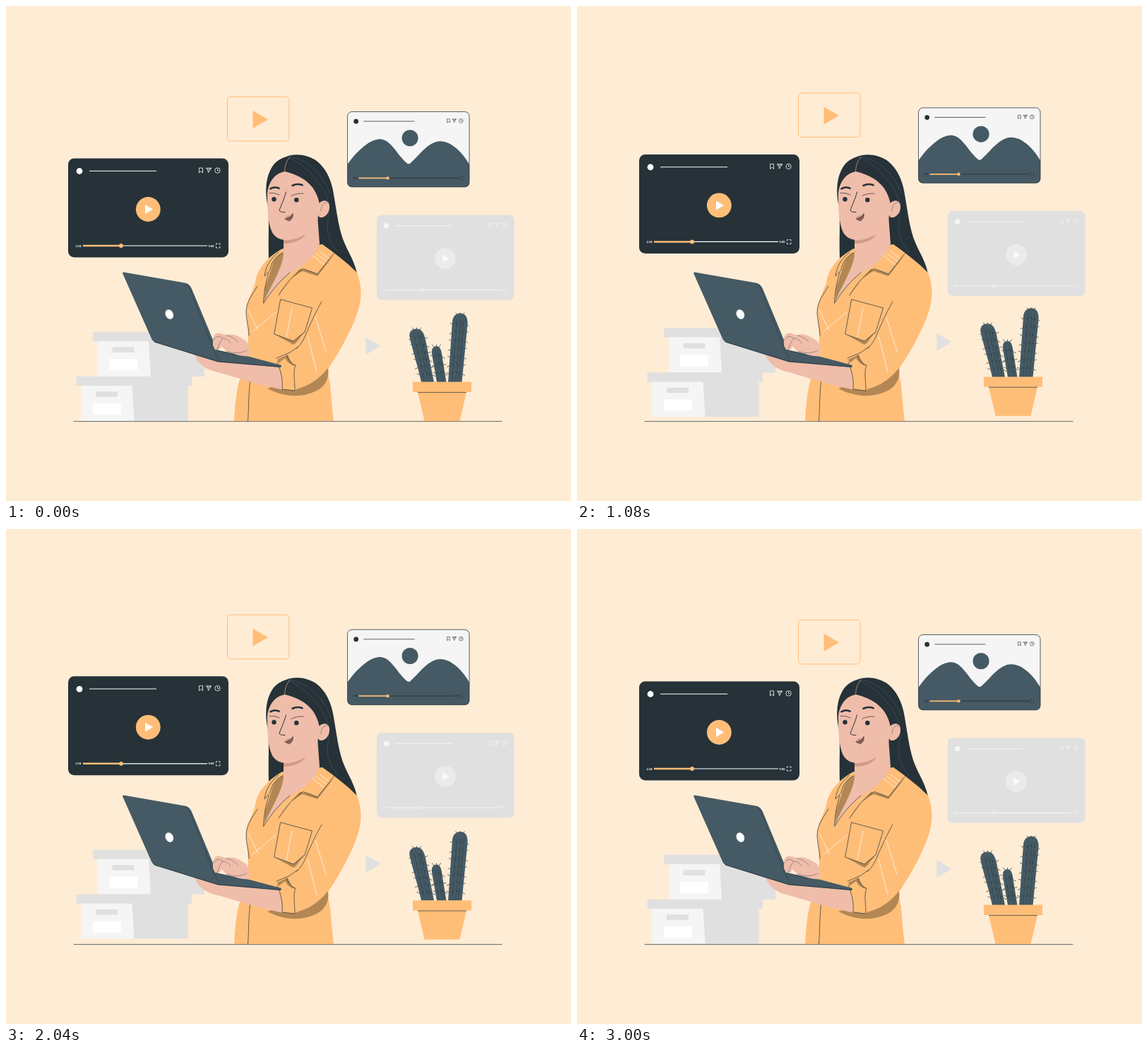
Recreate the animation shown at these times as an HTML page. Size 800 px wide and 700 px high, loop 3040 ms.

```html
<!DOCTYPE html>
<html lang="en">
<head>
<meta charset="utf-8">
<title>Video studio</title>
<style>
  html, body { margin: 0; width: 100%; height: 100%; overflow: hidden; background: #ffecd5; }
  svg { display: block; width: 800px; height: 700px; }
  .orange { fill: #ffbe78; }
  .brown { fill: #b28754; }
  .skin { fill: #efbdaa; }
  .blush { fill: #d39b87; }
  .slate { fill: #455a64; }
  .dark { fill: #263238; }
  .grey { fill: #e0e0e0; }
  .pale { fill: #f5f5f5; }
  .white { fill: #fff; }
  .ink, .stitch, .strand { fill: none; stroke-linecap: round; stroke-linejoin: round; }
  .ink { stroke: #263238; stroke-width: .7; }
  .brow { stroke-width: 2.6; }
  .soft { stroke-opacity: .55; }
  .fine { stroke-width: .5; }
  .stitch { stroke: #fff; stroke-width: .7; }
  .strand { stroke: #455a64; stroke-width: .6; }
  text { font: 700 4px "Open Sans", Inter, sans-serif; }
</style>
</head>
<body>
<svg viewBox="0 0 800 700">
  <g class="float">
    <rect class="grey" x="123" y="460.7" width="160" height="13.5"/>
    <path class="grey" d="M195 474H281V524H195Z"/>
    <path class="pale" d="M130 474H202L205 524H130Z"/>
    <rect class="grey" x="150.5" y="482.3" width="31" height="7.5"/>
    <rect class="white" x="146" y="499" width="40" height="16"/>
    <rect class="grey" x="99.6" y="523.7" width="163.4" height="13.5"/>
    <path class="grey" d="M170 537H257.5V586.7H170Z"/>
    <path class="pale" d="M106 537H178.5L181.5 586.7H106Z"/>
    <rect class="grey" x="127" y="545.3" width="31" height="7.5"/>
    <rect class="white" x="123" y="562" width="40" height="16"/>
  </g>

  <path class="ink" d="M96 587.4H702"/>

  <g class="float" id="panels">
    <rect x="313.5" y="128.5" width="87.5" height="62.5" rx="4.5" fill="none" stroke="#ffbe78"/>
    <path class="orange" d="M349.5 148L371 160.5L349.5 173Z"/>
    <path class="grey" d="M509.3 468L530.5 480.7L509.3 493.5Z"/>
  </g>

  <g id="plant">
    <g id="cacti"></g>
    <path class="orange" d="M576 531.6H659V546H652L642.5 587H592.5L583 546H576Z"/>
    <path class="ink" d="M583.5 546.4H651.5"/>
  </g>

  <g id="woman">
    <path class="dark" d="M372 357C371 330 373 308 371 284C366 264 367 239 380 223C386 217 393 214 397 213C409 208 428 210 441 220C453 230 460 245 463 261C467 282 469 301 474 320C480 343 492 355 497 378L440 350H393Z"/>
    <path class="strand" d="M399 214C424 223 446 250 455 272C461 290 453 303 456 321C458 332 464 341 470 348M405 214C430 219 450 240 459 265"/>

    <path class="orange" d="M393 343C377 350 359 366 354 385C352 402 340 415 340 432C341 450 346 470 340 492C333 508 334 520 329 535C325 553 324 570 323 587H464C462 570 460 550 459 535C457 527 456 520 456 513C473 488 491 456 499 429C504 412 504 395 497 377C482 362 465 349 448 337Z"/>

    <path class="skin" d="M393 322V349C391 366 378 385 369 400L364.5 420C374 406 388 389 402 378C420 371 438 352 444 336L441 296Z"/>
    <path class="blush" d="M393 331C405 331 417 327 426 320C420 331 408 336 393 336Z"/>
    <path class="skin" d="M395 234C381 236 371 249 370 266C370 288 371 306 376 318C380 328 390 332 401 331C420 328 436 317 441 303L444 280C440 262 431 243 395 234Z"/>
    <path class="skin" d="M442 281C446 274 455 273 457.5 280C460 290 453 300 445 299C441 299 440 288 442 281Z"/>
    <path class="ink soft" d="M446 290C446 282 450 277 455 278"/>
    <path class="strand" style="stroke:#efbdaa" d="M394.5 234C395 224 398 217 403 213"/>
    <path class="ink brow" d="M374.5 258.3Q380 255 386.500 257.800M405.500 254Q412 250.500 419.500 253.300"/>
    <path class="ink" d="M373 264.500Q380 263.500 387 267M404 268.500Q411 264.500 421 265.200"/>
    <circle class="dark" cx="379.5" cy="273.2" r="3.2"/>
    <circle class="dark" cx="411.3" cy="274.2" r="3.2"/>
    <path class="ink" style="stroke-width:1" d="M396.500 263C394 273 389 283 387 289C388 291.500 392 291.500 395 291.500"/>
    <path fill="#8b5f50" d="M395 301C400 300 404 297 406 293.500C407 300 402 305.500 397 303Z"/>
    <path class="blush" d="M395 299.500C398 296 401 295 403 297.500L396 301.500Z"/>
    <path class="ink" d="M395 301C400 300.500 404 297.500 406 293.500C407 299 404 303.500 400 304"/>

    <path class="brown" d="M393 346C394 363 382 384 368 412L365.500 418L367 398L375 374C378 360 384 351 393 346Z"/>
    <path class="orange" d="M392 343C378 350 370 360 366 381L374 373C377 360 384 353 393 348Z"/>
    <path class="ink" d="M386 348C375 357 368 367 366 382L374 373C375 364 381 355 391 349M372 377C368 390 365 404 364.500 420"/>

    <path class="brown" d="M386 409C396 395 407 381 420 375L441 382L465 351L441 376L416 372Z"/>
    <path class="orange" d="M447 337L464 350L441 379L420 371L401 377C421 369 439 354 447 337Z"/>
    <path class="ink" d="M464 350L441 379L421 371.500C408 378 396 393 386 409M402 377C387 389 374 405 365 420"/>
    <path class="stitch" d="M434 353L451 366M439 350L454 361M444 347L457 357"/>

    <path class="brown" d="M380 464L407 474L423 460L411 476L407 479Z"/>
    <path class="ink" d="M389 415L433.500 427L423 461L407 474L380 464Z"/>
    <path class="stitch" d="M405 427L397 468M343 430L357 459M382 433L348 461M438 440L453 488M427 467L440 517"/>
    <path class="ink" d="M356 396C348 410 340 418 340 434C341 449 344 456 344 466M447 418C440 430 431 449 426 461C421 474 416 480 411 485M346 528C343 550 344 569 342.500 587"/>
    <path class="brown" d="M370 541L390 534L409 542C431 538 446 524 456 512C458 525 453 537 440 544C417 555 394 553 370 541Z"/>
    <path class="skin" d="M267 493C271 504 280 513 296 517C323 524 350 534 393 543L389 507L300 490Z"/>
    <path class="orange" d="M383 498L401 489L421 481L435 523L409 544L391 542C392 528 388 517 383 506Z"/>
    <path class="brown" d="M384 500L399 493C401 500 405 505 409 509C402 507 398 503 395 498L386 505Z"/>
    <path class="ink" d="M391 542L409 544C409 530 406 517 410 508C402 506 400 498 397 494M383 498L402 490L413 482M384 504C390 518 392 529 391 542"/>

    <path class="slate" d="M167 376.500L253 391.500Q260 392.800 263 400L299 486.500L345 496L390 508L389 511L300 503.500L212 476Q207 474 205 468L165.500 379Q164.500 376 167 376.500Z"/>
    <path class="ink fine" d="M254 392Q258 394 260 399L294 486L301 499M299 487L325 494"/>
    <path class="ink" d="M210 475L300 502.500L389 510.500"/>
    <ellipse class="white" cx="231.3" cy="436" rx="5.5" ry="7" transform="rotate(-28 231.3 436)"/>
    <path class="skin" d="M293 480C293 473 292 465 298 463C304 461 308 466 312 465C322 462 331 468 339 473C344 479 346 487 344 495C332 496 322 491 313 489L305 481L302 486L296 486Z"/>
    <path class="ink soft" d="M294 472C298 466 302 466 307 470C303 474 301 480 299 486M307 470C312 470 316 473 318 477M312 466C320 467 325 472 328 475M313 488C322 492 334 491 341 487"/>
  </g>
</svg>

<script>
const NS = "http://www.w3.org/2000/svg";

function add(parent, html) {
  const g = document.createElementNS(NS, "g");
  g.innerHTML = html;
  parent.append(g);
  return g;
}

// A player window, designed at 227 x 140 and scaled into place.
function player({ x, y, scale, fill, ink, bar, stroke = "none", iconAlpha = 1, middle }) {
  const line = `fill="none" stroke="${ink}" stroke-width=".8" opacity="${iconAlpha}"`;
  const g = add(document.getElementById("panels"), `
    <rect width="227" height="140" rx="8.5" fill="${fill}"/>
    ${middle}
    <rect width="227" height="140" rx="8.5" fill="none" stroke="${stroke}"/>
    <circle cx="16" cy="18" r="4.4" fill="${ink}"/>
    <path d="M30 17.8H125" stroke="${ink}"/>
    <path ${line} d="M185.5 13.5h5v7l-2.5-2.5l-2.5 2.5zM195.5 13.7h7l-4 6.5l-.7-4zl2.3 2.5l4.7-2.5"/>
    <circle ${line} cx="211.5" cy="17" r="3.7"/>
    <path ${line} d="M211.5 14.5v2.7h2"/>
    <path d="M75 123.5H197" stroke="${ink}" stroke-width="1.2"/>
    <path d="M21 123.5H75" stroke="${bar}" stroke-width="2.4"/>
    <circle cx="75" cy="123.5" r="2.9" fill="${bar}"/>
    <g fill="${ink}" opacity="${iconAlpha}"><text x="10.5" y="125">2:34</text><text x="198.5" y="125">9:00</text></g>
    <path ${line} d="M209.5 122.5v-2h2M213 120.500h2v2M215 124.500v2h-2M211.500 126.500h-2v-2"/>`);
  g.setAttribute("transform", `translate(${x} ${y}) scale(${scale})`);
}

const button = (color, play) => `
  <circle cx="113.3" cy="72" r="17.4" fill="${color}"/>
  <path d="M109 65.5L120 72L109 78.5Z" fill="${play}"/>`;

player({ x: 88, y: 215.5, scale: 1, fill: "#263238", ink: "#fff", bar: "#ffbe78",
  middle: button("#ffbe78", "#fff") });
player({ x: 483.5, y: 149.5, scale: .76, fill: "#f5f5f5", ink: "#263238", bar: "#ffbe78",
  stroke: "#263238", middle: `
  <circle class="slate" cx="116.5" cy="49" r="15.2"/>
  <path class="slate" d="M0 98C17 73 42 51 60 51C81 51 92 80 110 95Q114 99 118 95C134 81 151 55 173 55C194 55 215 77 227 98V131.500q0 8.500-8.500 8.500H8.500Q0 140 0 131.500Z"/>` });
player({ x: 524.8, y: 295.4, scale: .858, fill: "#e0e0e0", ink: "#f5f5f5", bar: "#ebebeb",
  middle: button("#ebebeb", "#fafafa") });

// Cactus arms: outline, then base and tip of the axis with half-width for ribs and spines.
const arms = [
  ["M588 532C582 505 574 481 571.5 468C570 460 576 456 582 456.5C589 457 592 463 594 472L606 532Z", 597, 532, 581.5, 460, 10],
  ["M610 532L603 492C602 484 606 480.5 610 481C616 481.5 617 490 618 498L623.5 532Z", 616.5, 532, 609.5, 484, 7],
  ["M626 532L632 446C633 437 639 434 644 434.5C651 435 654 441 653.5 450L645.5 532Z", 635.5, 532, 643, 439, 10]
];

for (const [shape, x0, y0, x1, y1, half] of arms) {
  let spines = "", marks = "";
  const n = Math.round((y0 - y1) / 11);
  for (let i = 1; i < n; i++) {
    const p = i / n, x = x0 + (x1 - x0) * p, y = y0 + (y1 - y0) * p;
    const tilt = i % 2 ? -2 : 1.5;
    spines += `M${x - half + 1} ${y}l-4 ${tilt}M${x + half - 1} ${y}l4 ${-tilt}`;
    marks += `M${x - half * .4} ${y}l-1 -2.5M${x + half * .1} ${y - 4}l1 2.5M${x + half * .5} ${y}l1 -2.5`;
  }
  for (const dx of [-4, 0, 4]) spines += `M${x1 + dx} ${y1 - 2}l${dx / 2} -3`;
  const rib = k => `M${x0 + half * k} ${y0}L${x1 + half * k} ${y1 + 4}`;
  add(document.getElementById("cacti"), `
    <path class="ink" d="${spines}"/>
    <path class="slate" d="${shape}"/>
    <path class="ink fine soft" d="${rib(-.4)}${rib(.1)}${rib(.5)}"/>
    <path class="ink" d="${marks}"/>`);
}

// Linear bobbing, sampled at 24 pictures per second.
const LOOP = 3040, STEP = 1000 / 24, LAST = 72, RISE = 10;
const floats = document.querySelectorAll(".float");
const plant = document.getElementById("plant");

function lift(t, period) {
  const p = (t % period) / period;
  return -RISE * (1 - Math.abs(1 - 2 * p));
}

const origin = performance.now();
function draw(now) {
  const elapsed = Math.max(0, now - origin) % LOOP;
  const t = Math.min(LAST, Math.floor((elapsed + 5) / STEP)) * STEP;
  for (const g of floats) g.setAttribute("transform", `translate(0 ${lift(t, 1500)})`);
  plant.setAttribute("transform", `translate(0 ${lift(t, 3000)})`);
  requestAnimationFrame(draw);
}
draw(origin);
</script>
</body>
</html>
```
